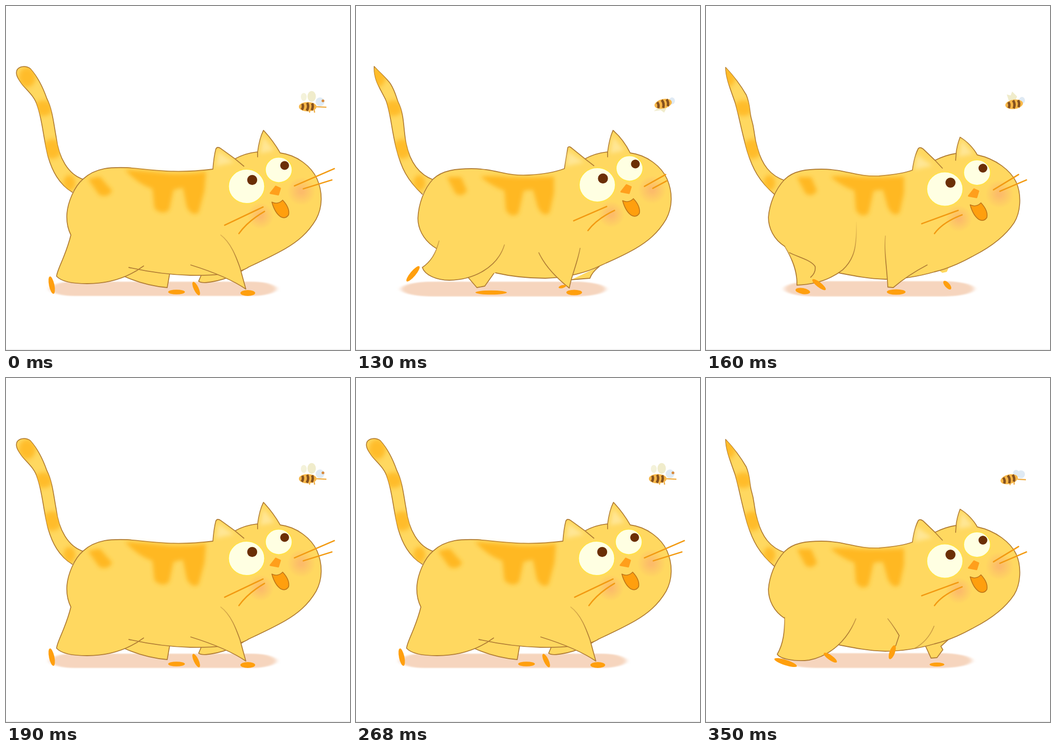
An HTML page without scripts for the animation above (380 ms loop, 700x700 px).

```html
<!DOCTYPE html>
<html lang="en">
<head>
<meta charset="utf-8">
<title>Cat following a bee</title>
<style>
  html, body { margin: 0; width: 100%; height: 100%; overflow: hidden; background: #fff; }
  svg { display: block; width: 100%; height: 100%; }

  .fur { fill: #ffd860; }
  .ink { stroke: #b07c34; stroke-width: 1.8; stroke-linecap: round; stroke-linejoin: round; }
  .leg { stroke: url(#fade); }
  .line { fill: none; }
  .faint { opacity: .6; }
  .foot { fill: #ff9f0e; }
  .patch { fill: #ffb824; }
  .light { fill: #ffe694; }
  .shade { fill: #f6d5be; }
  .whisker { fill: none; stroke: #f29a12; stroke-width: 2.8; stroke-linecap: round; }
  .wing { fill: #f0eccb; }
  .sky { fill: #dfeaf4; }

  /* a, b and c repeat every half loop; s1 to s5 use all of it */
  .a, .b, .c, .s1, .s2, .s4, .s5 { visibility: hidden; animation: 380ms step-end infinite; }
  .a, .b, .c { animation-duration: 190ms; }
  .a { animation-name: a; }
  .b { animation-name: b; }
  .c { animation-name: c; }
  .s1 { animation-name: s1; }
  .s2 { animation-name: s2; }
  .s4 { animation-name: s4; }
  .s5 { animation-name: s5; }
  @keyframes a { 0% { visibility: visible } 68.421%, to { visibility: hidden } }
  @keyframes b { 0% { visibility: hidden } 68.421% { visibility: visible } 84.21%, to { visibility: hidden } }
  @keyframes c { 0% { visibility: hidden } 84.21%, to { visibility: visible } }
  @keyframes s1 { 0% { visibility: hidden } 34.21% { visibility: visible } 42.105%, to { visibility: hidden } }
  @keyframes s2 { 0% { visibility: hidden } 42.105% { visibility: visible } 50%, to { visibility: hidden } }
  @keyframes s4 { 0% { visibility: hidden } 84.21% { visibility: visible } 92.105%, to { visibility: hidden } }
  @keyframes s5 { 0% { visibility: hidden } 92.105%, to { visibility: visible } }
</style>
</head>
<body>
<svg viewBox="0 0 700 700">
  <defs>
    <filter id="soft" x="-20%" y="-20%" width="140%" height="140%"><feGaussianBlur stdDeviation="4"/></filter>
    <filter id="edge" x="-5%" y="-30%" width="110%" height="160%"><feGaussianBlur stdDeviation="5 1.2"/></filter>
    <radialGradient id="blush">
      <stop offset=".15" stop-color="#fbb56c" stop-opacity=".8"/>
      <stop offset="1" stop-color="#fbb56c" stop-opacity="0"/>
    </radialGradient>
    <linearGradient id="fade" gradientUnits="userSpaceOnUse" x1="0" y1="435" x2="0" y2="520">
      <stop stop-color="#b07c34" stop-opacity="0"/>
      <stop offset="1" stop-color="#b07c34"/>
    </linearGradient>

    <path id="tailA" d="M135,379C107,362 94,335 86,308C76,270 74,232 64,204C58,182 40,170 31,157C24,147 18,138 23,129C30,121 43,122 50,128C66,146 76,168 83,188C95,212 97,240 102,266C107,308 126,343 158,353"/>
    <path id="tailB" d="M135,383C104,354 92,330 82,290C72,252 70,212 60,190C48,166 36,150 37,123C50,137 62,147 70,158C80,174 82,186 86,196C99,222 96,250 102,280C110,318 128,343 158,354"/>
    <path id="tailC" d="M139,383C108,356 95,332 84,296C72,255 66,218 59,196C50,170 40,146 40,125C56,142 70,160 82,181C90,200 88,212 92,228C101,258 96,262 105,290C114,322 130,345 160,355"/>
    <clipPath id="clipA"><use href="#tailA"/></clipPath>
    <clipPath id="clipB"><use href="#tailB"/></clipPath>
    <clipPath id="clipC"><use href="#tailC"/></clipPath>
    <g id="bands" class="patch" filter="url(#soft)" opacity=".85">
      <ellipse cx="43" cy="145" rx="17" ry="20"/>
      <ellipse cx="76" cy="208" rx="19" ry="16"/>
      <ellipse cx="94" cy="291" rx="19" ry="20"/>
      <ellipse cx="129" cy="360" rx="12" ry="16"/>
    </g>

    <g id="patches" class="patch" filter="url(#soft)">
      <path d="M185,348L214,348L226,376Q215,391 202,381Z"/>
      <path d="M253,347Q280,344 310,348Q350,350 403,347L403,380L394,420Q382,432 370,410L360,374L341,376L331,421Q318,434 305,416L302,376Q275,366 253,347Z"/>
    </g>

    <g id="ears" class="light" filter="url(#soft)">
      <path d="M432,296L464,318L428,326Z"/>
      <path d="M523,265L546,294L517,300Z"/>
    </g>

    <g id="face">
      <circle cx="518" cy="427" r="27" fill="url(#blush)"/>
      <circle cx="601" cy="377" r="29" fill="url(#blush)"/>
      <g fill="#ffffe2" stroke="#ffe14a" stroke-width="2.2">
        <ellipse cx="489.500" cy="367" rx="37" ry="35"/>
        <ellipse cx="555" cy="333.500" rx="27.500" ry="26"/>
      </g>
      <g fill="#6b2f06">
        <circle cx="501" cy="354" r="10.200"/>
        <circle cx="567" cy="324.500" r="9"/>
      </g>
      <path d="M538,381L549,367L558,371L554,384Z" fill="#ff9f1c" stroke="#ff9f1c" stroke-width="3" stroke-linejoin="round"/>
      <path d="M541,399Q553,405 563,395Q578,411 575,425Q569,434 559,429Q547,421 541,399Z" fill="#ff9f0e" stroke="#bf7618" stroke-width="1.700" stroke-linejoin="round"/>
    </g>

    <g id="bee">
      <ellipse rx="18" ry="9.500" fill="#f7b748"/>
      <path d="M-11,-6Q-8,0 -12,6M-1,-8Q3,0 -2,8M9,-7Q12,0 8,7" fill="none" stroke="#855220" stroke-width="5"/>
    </g>
  </defs>

  <rect y="698" width="700" height="2" fill="#f1f1f1"/>

  <!-- ground shadows -->
  <g class="shade" filter="url(#edge)">
    <rect class="a" x="89" y="561" width="461" height="29" rx="50" ry="14.500"/>
    <rect class="s1" x="92" y="561" width="416" height="30" rx="60" ry="15"/>
    <rect class="s2" x="160" y="560" width="385" height="31" rx="60" ry="15"/>
    <rect class="s4" x="126" y="560" width="426" height="31" rx="60" ry="15"/>
    <rect class="s5" x="162" y="560" width="379" height="30" rx="60" ry="15"/>
  </g>

  <!-- tails -->
  <g class="a"><use href="#tailA" class="fur ink"/><g clip-path="url(#clipA)"><use href="#bands"/></g></g>
  <g class="b"><use href="#tailB" class="fur ink"/><g clip-path="url(#clipB)"><use href="#bands"/></g></g>
  <g class="c"><use href="#tailC" class="fur ink"/><g clip-path="url(#clipC)"><use href="#bands"/></g></g>

  <!-- far legs -->
  <g class="fur ink">
    <g class="a">
      <path d="M238,549C262,560 295,570 328,573L333,545L280,530"/>
      <path d="M398,546L392,560Q398,565 420,561Q465,553 497,527"/>
    </g>
    <g class="s1">
      <path d="M227,551L246,573L262,570L282,542"/>
      <path d="M438,557L476,554Q480,542 495,530"/>
    </g>
    <path class="s2" d="M474,538L481,543L490,541L496,528" stroke="none"/>
    <g class="s4">
      <path d="M156,492C156,515 146,530 132,544Q134,552 155,551Q190,550 210,545"/>
      <path d="M476,534L489,537L500,528" stroke="none"/>
    </g>
    <path class="s5" d="M447,546L458,570L470,569L482,553L478,546L500,526"/>
  </g>

  <!-- bodies -->
  <g class="a">
    <path class="fur ink" d="M280,529C245,555 205,565 165,565C135,565 112,560 103,550C103,538 122,508 132,466C124,450 123,435 124,422C126,400 138,368 157,352C183,328 215,328 247,329C300,333 340,342 421,332Q423,306 427,291Q430,285 437,290L466,311Q488,299 512,297C514,282 518,264 524,253C538,268 550,285 558,299C592,303 622,327 633,352C645,380 644,410 631,434C614,463 592,480 568,494C540,510 515,521 494,531C475,545 420,549 375,548C330,547 290,541 250,532"/>
    <use href="#ears"/>
    <path class="ink line" d="M466,311L484,326M512,297L512,307"/>
    <g class="patch" filter="url(#soft)">
      <path d="M167,352L191,347L216,376Q207,392 189,384Z"/>
      <path d="M242,333Q290,336 330,341Q370,343 407,337L404,375L392,420Q380,430 368,410L360,370L341,374L332,415Q318,427 302,412L298,372Q268,362 242,333Z"/>
    </g>
  </g>
  <g class="b">
    <path class="fur ink" d="M228,552C205,525 180,503 157,489C136,474 126,452 126,432C127,404 138,372 157,352C176,334 205,331 235,331C285,331 305,347 352,344C385,342 405,338 424,331L431,288Q434,284 440,290L466,311Q488,299 512,297C514,282 518,264 523,253C538,266 550,283 558,299C592,303 622,327 633,352C645,380 644,410 631,434C614,463 592,480 568,494C540,510 520,518 498,528C470,542 430,553 385,554C345,554 310,549 284,543"/>
    <use href="#ears"/>
    <path class="ink line" d="M466,311L484,325M512,297L512,307"/>
    <use href="#patches"/>
  </g>
  <g class="c">
    <path class="fur ink" d="M228,552C205,525 183,503 160,489C138,475 127,452 127,430C129,404 140,374 160,353C178,335 205,332 235,332C285,332 305,348 352,346C385,343 405,340 420,334Q424,305 432,290Q436,286 442,291L466,314Q488,303 509,300C510,287 514,275 517,267C531,275 545,290 552,303C590,311 620,335 631,358C643,385 640,420 627,441C609,468 582,489 545,508C520,522 495,534 465,541C430,551 400,556 365,556C330,555 300,549 270,543"/>
    <use href="#ears" x="-3" y="7"/>
    <path class="ink line" d="M466,314L481,330M509,300L508,314"/>
    <use href="#patches"/>
  </g>

  <!-- near legs and feet -->
  <g class="a">
    <path class="fur ink leg" d="M437,466C458,482 468,510 476,532L488,576Q450,550 376,527"/>
    <g class="foot">
      <ellipse rx="18" ry="5.500" transform="translate(93 568) rotate(78)"/>
      <ellipse cx="347" cy="582" rx="17" ry="4.800"/>
      <ellipse rx="15" ry="5" transform="translate(387 575) rotate(65)"/>
      <ellipse cx="492" cy="584" rx="15" ry="6"/>
    </g>
  </g>
  <g class="s1">
    <path class="fur ink leg" d="M169,478C162,505 152,520 135,532C140,548 165,558 190,558C240,557 288,532 302,486"/>
    <path class="fur ink leg" d="M372,502C385,530 410,555 434,574C438,550 450,525 456,493"/>
    <g class="foot">
      <ellipse rx="20" ry="5.500" transform="translate(116 545) rotate(-50)"/>
      <ellipse cx="275" cy="583" rx="32" ry="4.200"/>
      <ellipse rx="8" ry="3" transform="translate(420 571) rotate(-15)"/>
      <ellipse cx="444" cy="583" rx="16" ry="5.500"/>
    </g>
  </g>
  <g class="s2">
    <path class="fur ink leg" d="M160,489C176,515 186,540 185,568C215,567 250,559 278,537C302,515 307,490 306,440"/>
    <path class="ink line" d="M170,502C190,512 214,517 222,530Q224,542 213,552"/>
    <path class="fur ink leg" d="M365,468C362,500 368,530 370,572L381,573Q410,548 450,527"/>
    <g class="foot">
      <ellipse rx="15" ry="6" transform="translate(197 580) rotate(10)"/>
      <ellipse rx="17" ry="5" transform="translate(230 567) rotate(38)"/>
      <ellipse cx="387" cy="582" rx="19" ry="5.500"/>
      <ellipse rx="11" ry="5" transform="translate(491 568) rotate(48)"/>
    </g>
  </g>
  <g class="s4">
    <path class="fur ink leg" d="M157,490C188,507 213,535 217,573Q233,579 251,575C292,562 308,515 310,450"/>
    <path class="ink leg line" d="M366,478C372,500 378,520 372,535L357,551"/>
    <path class="ink line faint" d="M453,518Q440,537 418,548"/>
    <path class="whisker" d="M511,563L516,571L522,563"/>
    <g class="foot">
      <path d="M141,544Q122,546 117,570Q124,573 126,560Q128,552 141,548Z"/>
      <ellipse cx="247" cy="586" rx="33" ry="4.200"/>
      <ellipse cx="352" cy="567" rx="5.500" ry="17"/>
      <ellipse cx="527" cy="583" rx="17" ry="4"/>
    </g>
  </g>
  <g class="s5">
    <path class="fur ink leg" d="M160,487C160,515 158,540 145,562C150,571 180,578 210,574C255,565 288,532 305,490"/>
    <path class="ink leg line" d="M370,490Q382,505 393,524L386,545"/>
    <path class="ink line faint" d="M464,505Q452,535 425,550"/>
    <g class="foot">
      <ellipse rx="24" ry="5.500" transform="translate(162 579) rotate(18)"/>
      <ellipse rx="16" ry="5" transform="translate(253 569) rotate(35)"/>
      <ellipse rx="15" ry="5.500" transform="translate(379 558) rotate(110)"/>
      <ellipse cx="470" cy="583" rx="15" ry="4"/>
    </g>
  </g>

  <!-- faces and whiskers -->
  <g class="a">
    <use href="#face"/>
    <path class="whisker" d="M445,446L523,409M474,463Q492,438 526,418M587,366L668,331M605,372L663,354"/>
  </g>
  <g class="b">
    <use href="#face" x="1.500" y="-3"/>
    <path class="whisker" d="M443,437L510,408M472,457Q490,433 526,416M587,367L630,343M604,371L632,356"/>
  </g>
  <g class="c">
    <use href="#face" x="-3.500" y="5.500"/>
    <path class="whisker" d="M439,443L513,416M465,463Q482,440 521,425M585,374L636,343M598,377L652,354"/>
  </g>

  <!-- bee -->
  <g class="a">
    <ellipse class="wing" cx="606" cy="185" rx="6" ry="8" opacity=".7"/>
    <ellipse class="wing" cx="622" cy="184" rx="8.500" ry="11"/>
    <use href="#bee" x="614" y="205"/>
    <circle class="sky" cx="639" cy="195" r="9"/>
    <circle cx="645" cy="193" r="2.800" fill="#d98a3c"/>
    <path d="M632,205L652,206M617,212L618,217M627,211L628,217" stroke="#f0b04a" stroke-width="2.500"/>
  </g>
  <g class="s1">
    <path class="wing" d="M606,214L618,205L634,204L627,217L620,212Z"/>
    <ellipse class="sky" cx="643" cy="193" rx="6" ry="7"/>
    <use href="#bee" transform="translate(625 199) rotate(-14)"/>
  </g>
  <g class="s2">
    <path class="wing" d="M612,180L620,182L623,174L633,184L630,192L616,192Z"/>
    <ellipse class="sky" cx="643" cy="192" rx="6" ry="7"/>
    <use href="#bee" transform="translate(627 200) rotate(-8)"/>
  </g>
  <g class="s4">
    <ellipse class="wing" cx="617" cy="188" rx="6" ry="8" opacity=".7"/>
    <path class="wing" d="M622,194L629,178L645,188L638,198Z"/>
    <circle class="sky" cx="646" cy="200" r="7.500"/>
    <use href="#bee" transform="translate(625 205) rotate(-10) scale(.92 .8)"/>
  </g>
  <g class="s5">
    <circle class="sky" cx="631" cy="193" r="6"/>
    <circle class="sky" cx="641" cy="196" r="8"/>
    <path d="M634,206L651,207M618,213L619,218M627,211L627,217" stroke="#f0b04a" stroke-width="2.500"/>
    <use href="#bee" transform="translate(617 206) rotate(-14)"/>
  </g>
</svg>
</body>
</html>
```
